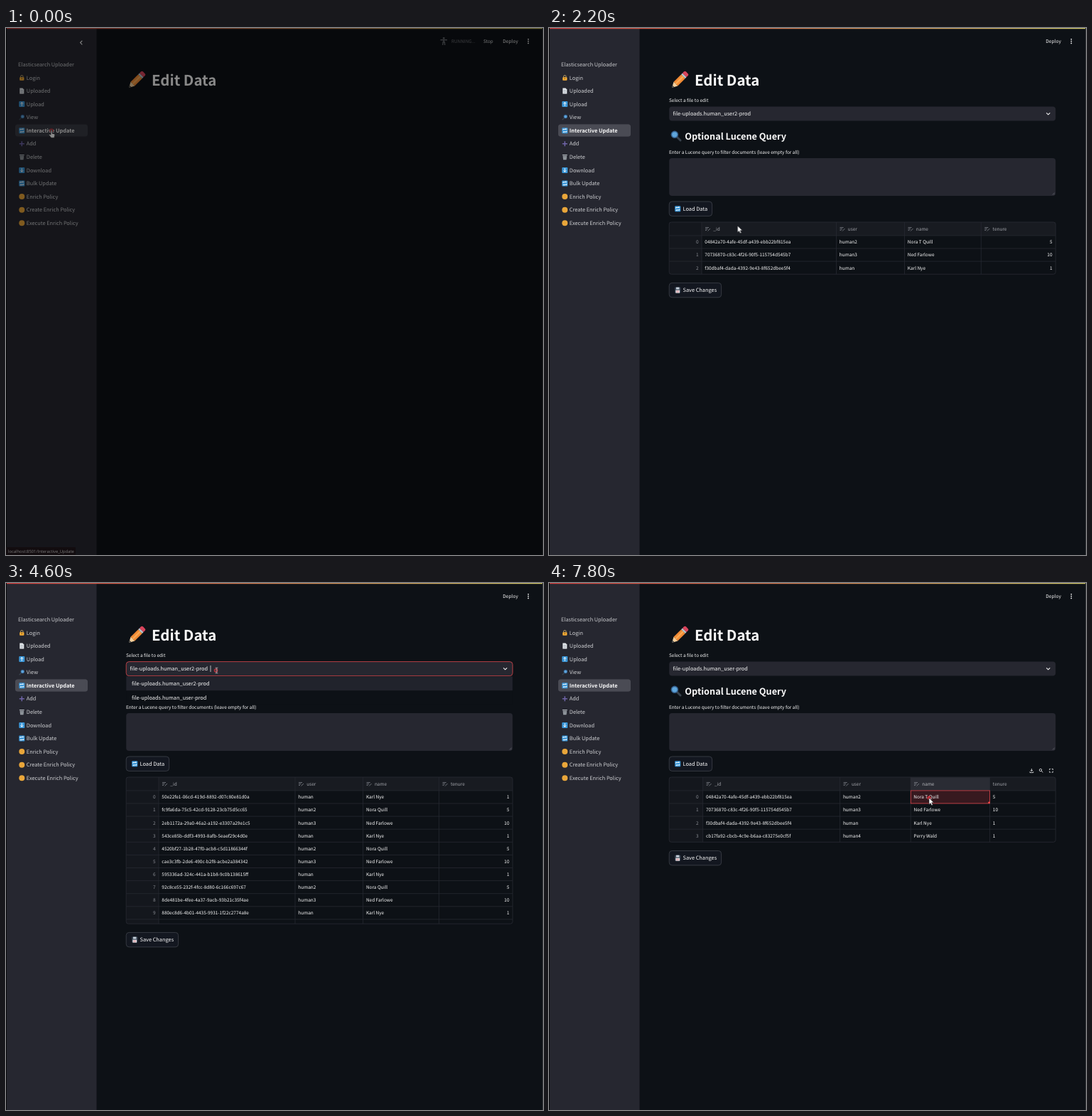
An HTML page that plays this animation: 756x741 px, repeating every 8 s.

```html
<!DOCTYPE html>
<html lang="en">
<head>
<meta charset="utf-8">
<title>Edit Data</title>
<style>
  html, body { margin: 0; width: 100%; height: 100%; overflow: hidden; background: #0d1116; }
  svg { display: block; width: 100vw; height: 100vh; text-rendering: geometricPrecision;
    font-family: "Noto Sans CJK JP", "Noto Sans CJK SC", "Noto Sans CJK", "Noto Sans", sans-serif; }
  .ripple { fill: none; stroke: #c4313c; stroke-width: 1.6px; animation: ripple 8s step-end infinite; }
  @keyframes ripple {
    0% { r: 2px; opacity: .9; }
    2.5% { r: 4px; opacity: .8; }
    5% { r: 9px; opacity: .65; }
    7.5%, 100% { r: 9px; opacity: 0; }
  }
  #cursor { animation: travel 8s infinite; }
</style>
</head>
<body>
<svg id="stage" viewBox="0 0 756 741"></svg>
<script>
const LOOP = 8000, STEP = 200;
const WHITE = '#fafafa', RED = '#ff4b4b', PANEL = '#262730', LINE = '#262932', BG = '#0d1116';
const BODY = 7.4, SMALL = 6.47;
let css = '';
let count = 0;

const pct = ms => `${ms / LOOP * 100}%`;

// Shows the markup only inside the given [from, to] spans.
function during(spans, markup) {
  const name = `show${count++}`;
  const frames = spans.map(([from, to]) =>
    `${pct(from)}{opacity:1}` + (to < LOOP ? `${pct(to)}{opacity:0}` : '')).join('');
  css += `@keyframes ${name}{0%{opacity:0}${frames}}`;
  return `<g style="opacity:0;animation:${name} 8s step-end infinite">${markup}</g>`;
}

// y is the middle of the capitals.
const text = (x, y, str, size = BODY, fill = WHITE, attrs = '') =>
  `<text x="${x}" y="${y + size * .367}" font-size="${size}" fill="${fill}" ${attrs}>${str}</text>`;
const rect = (x, y, w, h, fill, attrs = '') =>
  `<rect x="${x}" y="${y}" width="${w}" height="${h}" fill="${fill}" ${attrs}/>`;
const stroke = (d, color, width = 1, attrs = '') =>
  `<path d="${d}" fill="none" stroke="${color}" stroke-width="${width}" ${attrs}/>`;
const fill = (d, color) => `<path d="${d}" fill="${color}"/>`;
const dot = (x, y, r, color) => `<circle cx="${x}" cy="${y}" r="${r}" fill="${color}"/>`;
const at = (x, y, markup, more = '') => `<g transform="translate(${x} ${y}) ${more}">${markup}</g>`;

// Icons fill an 8 by 8 box.
const tile = glyph => rect(0, 0, 8, 8, '#3b97d8', 'rx="1"') + stroke(glyph, '#fff', 1);
const lens = stroke('M4.6 4.6L7.2 7.2', '#39424d', 1.5, 'stroke-linecap="round"') +
  dot(3, 3, 2.7, '#36618f') + dot(3, 3, 1.9, '#5fa6dc');
const icons = {
  lock: stroke('M2.3 4V2.4a1.7 1.7 0 0 1 3.4 0V4', '#b9a06a', 1) +
    rect(.9, 3.4, 6.2, 4.5, '#f5ad35', 'rx=".8"') + dot(4, 5.5, .7, '#5c3b12'),
  page: fill('M1 0h4l2 2v6H1z', '#e4e8ec') + stroke('M2.2 3h3.4M2.2 4.6h3.6M2.2 6.2h3.6', '#929ba5', .6),
  up: tile('M4 6.7V1.7M2.2 3.5L4 1.6l1.8 1.9'),
  down: tile('M4 1.3v5M2.2 4.5L4 6.4l1.8-1.9'),
  cycle: tile('M1.5 3.4V2.2h4.8M5.2 1l1.2 1.2M6.5 4.6v1.2H1.7M2.8 7L1.6 5.8'),
  view: at(8, 0, lens, 'scale(-1 1)'),
  plus: stroke('M4 .5v7M.5 4h7', '#6f64a8', 1.5),
  bin: stroke('M.6 1.2h6.8', '#b7bdc3', 1.1) + fill('M1.2 2.3h5.6L6.2 8H1.8z', '#a1a7ad') +
    stroke('M3 3v4M5 3v4', '#555b62', .6),
  disc: dot(4, 4, 4, '#e9a63a'),
  floppy: rect(0, 0, 8, 8, '#3c4856', 'rx=".8"') + rect(1.8, 0, 4.4, 2.8, '#c8d2dc') +
    rect(1.2, 4, 5.6, 4, '#e9edf0') + stroke('M2 5.3h4M2 6.7h4', '#d5606a', .6),
};

const pencil = at(184, 73, rect(-8, -4, 15, 8, '#f08a35') + rect(-8, -1.3, 15, 2.6, '#f9a852') +
  rect(7, -4, 2.5, 8, '#b9c6cd') + fill('M9.5-4h3q2 0 2 2v4q0 2-2 2h-3z', '#d9445c') +
  fill('M-8-4v8l-7.5-4z', '#f3cf9c') + fill('M-12.5-1.6v3.2l-3-1.6z', '#343a40'), 'rotate(-45)');

function sidebar() {
  const items = [['lock', 'Login'], ['page', 'Uploaded'], ['up', 'Upload'], ['view', 'View'],
    ['cycle', 'Interactive Update'], ['plus', 'Add'], ['bin', 'Delete'], ['down', 'Download'],
    ['cycle', 'Bulk Update'], ['disc', 'Enrich Policy'], ['disc', 'Create Enrich Policy'],
    ['disc', 'Execute Enrich Policy']];
  return rect(1, 1, 126.5, 740, PANEL) +
    rect(13, 135.5, 102, 17, '#3a3b44', 'rx="3.5"') +
    during([[800, LOOP]], rect(13, 135.5, 102, 17, '#4a4b54', 'rx="3.5"')) +
    text(17, 51, 'Elasticsearch Uploader', BODY, '#c9cacd') +
    items.map(([icon, label], i) => {
      const y = 69.8 + i * 18.59;
      const active = i === 4;
      return at(18.3, y - 4, icons[icon]) +
        text(28.8, y, label, BODY, active ? WHITE : '#cfd0d3', active ? 'font-weight="700"' : '');
    }).join('') +
    during([[0, 800]], stroke('M107.3 17.8l-2.7 2.8 2.7 2.8', WHITE, 1.1));
}

function header() {
  const running = dot(616.3, 14.3, 1.4, '#62656b') +
    stroke('M611.5 16.8h9.6M616.3 16.5v4M615.4 19l-.6 5M617.2 19l.6 5', '#62656b', 1.5) +
    text(627, 18.7, 'RUNNING...', 6.35, '#6d7076') + text(672, 18.7, 'Stop', 6.4, '#dcdddf');
  return during([[0, 800], [2600, 3600], [6400, 7000]], running) +
    text(699.3, 18.7, 'Deploy', 6.6) +
    [15.8, 18.6, 21.4].map(y => dot(735.3, y, .9, WHITE)).join('');
}

function button(y, w, icon, label, color = WHITE, edge = '#41444c') {
  return rect(169.2, y, w, 20.4, '#131720', `rx="4" stroke="${edge}" stroke-width=".8"`) +
    at(177.2, y + 6.2, icons[icon]) + text(188.5, y + 10.2, label, BODY, color);
}

function table({ cols, rows, bottom, plainTenure }) {
  const top = 273, rowH = 18.1, head = 18.9;
  const heads = ['_id', 'user', 'name', 'tenure'];
  let out = rect(169.2, top, 544, bottom - top, BG) +
    rect(169.2, top, 544, head, '#181b21') + rect(169.2, top, cols[0] - 169.2, bottom - top, '#14171d');
  let lines = cols.map(x => `M${x} ${top}V${bottom}`).join('');
  for (let y = top + head; y < bottom - 1; y += rowH) lines += `M169.2 ${y}H713`;
  out += stroke(lines, LINE, .8);
  heads.forEach((label, i) => {
    const bare = plainTenure && i === 3;
    if (!bare) out += stroke(`M${cols[i] + 5} 280.5h5m-5 2h3.5m-3.5 2h2m1.5 1l3.5-3.5`, '#858890', .8);
    out += text(cols[i] + (bare ? 4.2 : 16.3), 282.8, label, SMALL, '#a3a5ab');
  });
  rows.forEach(([id, user, name, tenure], i) => {
    const y = 301 + i * rowH;
    out += text(210.5, y, i, SMALL, '#8b8e95', 'text-anchor="end"');
    [id, user, name].forEach((value, c) => out += text(cols[c] + 4.3, y, value, SMALL));
    out += plainTenure ? text(cols[3] + 4.2, y, tenure, SMALL)
      : text(708.5, y, tenure, SMALL, WHITE, 'text-anchor="end"');
  });
  return out + rect(169.2, top, 544, bottom - top, 'none', `rx="3" stroke="${LINE}" stroke-width=".9"`) +
    button(bottom + 12.2, 73.4, 'floppy', 'Save Changes');
}

const karl = ['human', 'Karl Nye', 1];
const nora = ['human2', 'Nora Quill', 5];
const noraT = ['human2', 'Nora T Quill', 5];
const ned = ['human3', 'Ned Farlowe', 10];
const perry = ['human4', 'Perry Wald', 1];

const shortRows = [
  ['04842a70-4afe-45df-a439-ebb22bf815ea', ...noraT],
  ['70736870-c83c-4f26-90f5-115754d545b7', ...ned],
  ['f30dbaf4-dada-4392-9e43-8f652dbee5f4', ...karl],
];
const longRows = [
  '50e22fe1-06cd-419d-8892-d07c80e81d0a', 'fc9fa6da-75c5-42cd-9128-23cb75d5cc65',
  '2eb1172a-29a0-46a2-a192-e3307a29e1c5', '543ce85b-ddf3-4993-8afb-5eaef29c4d0e',
  '4520bf27-1b28-47f0-acb8-c5d11866344f', 'cae3c3fb-2de6-490c-b2f8-acbe2a384342',
  '595336ad-324c-441a-b1b8-9c0b138615ff', '92c8ce55-232f-4fcc-8d80-6c166c697c67',
  '8de481be-4fee-4a37-9acb-93b21c35f4ae', '880ec8d6-4b01-4435-9931-1f22c2774a8e',
].map((id, i) => [id, ...[karl, nora, ned][i % 3]]);

function tables() {
  const toolbar = stroke('M679.4 261v3.6m-1.6-1.6l1.6 1.7 1.6-1.7m-4 2.2v1.4h4.8v-1.4', '#d5d6d9', .9) +
    `<circle cx="692" cy="263" r="1.7" fill="none" stroke="#d5d6d9" stroke-width=".9"/>` +
    stroke('M693.3 264.3l2 2', '#d5d6d9', 1) +
    stroke('M704.6 263v-1.6h1.6m1.6 0h1.6v1.6m0 1.6v1.6h-1.6m-1.6 0h-1.6v-1.6', '#d5d6d9', .9);
  const selected = rect(509, 273.4, 111.5, 18.3, '#2a2c34') +
    stroke('M514 280.5h5m-5 2h3.5m-3.5 2h2m1.5 1l3.5-3.5', '#858890', .8) +
    text(525.3, 282.8, 'name', SMALL, '#b5b7bc') +
    rect(509.3, 291.9, 111.2, 18, '#37191f', 'stroke="#c83f46" stroke-width=".9"') +
    dot(619.5, 308.8, 1.3, RED) + text(513.3, 301, noraT[1], SMALL) + dot(535, 302, 2.6, '#c4313c');
  return during([[800, 3400]], table({ cols: [215, 404.5, 500.5, 608.3], rows: shortRows, bottom: 346.2 })) +
    during([[3400, 6800]], table({ cols: [215, 407, 502.6, 609.6], rows: longRows, bottom: 479.2 })) +
    during([[6800, LOOP]], table({ cols: [216.6, 409.6, 509.2, 620.6], bottom: 364.3, plainTenure: true,
      rows: [...shortRows, ['cb17fa92-cbcb-4c9e-b6aa-c83275e0cf5f', ...perry]] })) +
    during([[1400, 2200], [3800, 4400], [7000, LOOP]], toolbar) +
    during([[7800, LOOP]], selected);
}

function form() {
  const second = 'file-uploads.human_user2-prod', first = 'file-uploads.human_user-prod';
  const box = rect(169.2, 110.6, 544, 20, PANEL, 'rx="4"');
  const option = (y, label) => text(177, y, label);
  const menu = rect(169.2, 131.2, 544, 39.5, BG) +
    during([[4600, 4800]], rect(169.2, 131.2, 544, 20, '#21232c')) +
    during([[4800, 5400]], rect(169.2, 151.2, 544, 19.5, '#21232c')) +
    option(141, second) + option(161.4, first) + stroke('M288 116v9', WHITE, .7);
  return text(169, 102, 'Select a file to edit', SMALL) + box +
    during([[0, 5400]], text(174.5, 120.6, second)) +
    during([[5400, LOOP]], text(174.5, 120.6, first)) +
    stroke('M700.3 119.3l2.5 2.5 2.5-2.5', WHITE, 1.1) +
    during([[4600, 6200]], rect(169.2, 110.6, 544, 20, 'none', `rx="4" stroke="#c9444a" stroke-width=".9"`)) +
    at(171, 144, lens, 'scale(1.95)') +
    text(191.3, 152, 'Optional Lucene Query', 12.7, WHITE, 'font-weight="600"') +
    text(169, 174.8, 'Enter a Lucene query to filter documents (leave empty for all)', SMALL) +
    rect(169.2, 183, 544, 53, PANEL, 'rx="4"') + stroke('M708.8 234.5l3-3m-1.2 3l1.2-1.2', '#777a82', .6) +
    button(244, 60.4, 'cycle', 'Load Data') +
    during([[2400, 4600], [5800, 7800]], button(244, 60.4, 'cycle', 'Load Data', RED, '#d3484d')) +
    during([[4600, 5400]], menu);
}

function statusBar() {
  const bar = rect(0, 730, 98, 11, '#21161c', 'rx="1"') +
    `<text x="3" y="737.5" font-size="5.85" fill="#e3e1e2" font-family="Open Sans, Noto Sans, sans-serif">localhost:8501/Interactive_Update</text>`;
  return during([[0, 1200]], bar) + during([[1200, 1400]], `<g opacity=".55">${bar}</g>`);
}

function cursor() {
  const path = [[0, 64, 144], [400, 64, 144], [1200, 502, 271], [1600, 465, 305], [2000, 320, 300],
    [2400, 211, 256], [3400, 211, 256], [4000, 330, 400], [4200, 335, 330], [4600, 296.5, 123],
    [4800, 280, 158], [5400, 280, 158], [5800, 202.5, 260], [6600, 202.5, 260], [7200, 560, 300],
    [7400, 560, 300], [7800, 535, 302], [LOOP, 535, 302]];
  css += '@keyframes travel{' + path.map(([t, x, y], i) => {
    const next = path[i + 1];
    const steps = next ? (next[0] - t) / STEP : 1;
    return `${pct(t)}{transform:translate(${x}px,${y}px);animation-timing-function:steps(${steps},end)}`;
  }).join('') + '}';
  const shape = d => `<path d="${d}" fill="#fff" stroke="#15171c" stroke-width=".6" stroke-linejoin="round"/>`;
  const hand = shape('M-1 1a1 1 0 0 1 2 0v3.2l3 .7q1 .3.8 1.6l-.6 3q-.2.9-1 .9h-3q-.7 0-1.1-.6l-2.6-3.4q-.4-1.1.6-1.2l1.9 1z');
  const arrow = shape('M0 0v9.4l2.1-1.9 1.6 3.3 1.6-.8-1.5-3.2h2.9z');
  const beam = stroke('M-1.6-4q1.6 0 1.6 1v6q0 1-1.6 1M1.6-4q-1.6 0-1.6 1M1.6 4q-1.6 0-1.6-1', '#d2d2d4', .8);
  return [[0, 64, 144], [2400, 211, 256], [4600, 295.5, 123], [5400, 280, 158], [6200, 202.5, 260]]
    .map(([t, x, y]) =>
      `<circle class="ripple" cx="${x}" cy="${y}" r="2" style="animation-delay:${t - LOOP}ms"/>`).join('') +
    `<g id="cursor">${
      during([[0, 600], [2400, 3600], [4800, 6800]], hand) +
      during([[600, 2400], [3600, 4400], [6800, LOOP]], arrow) +
      during([[4400, 4800]], beam)}</g>`;
}

const scene = `<defs><linearGradient id="strip"><stop stop-color="#d8413f"/>
    <stop offset="1" stop-color="#d8cf70"/></linearGradient></defs>` +
  rect(0, 0, 756, 741, BG) + sidebar() + header() + pencil +
  text(205, 73.6, 'Edit Data', 20.4, WHITE, 'font-weight="700"') +
  during([[800, LOOP]], tables() + form()) +
  rect(0, 0, 1, 741, '#08090c') + rect(755, 0, 1, 741, '#2a2d30') +
  rect(1, 0, 754, 1.2, 'url(#strip)') +
  statusBar() + cursor() +
  during([[0, STEP]], rect(0, 0, 756, 741, '#000', 'fill-opacity=".46"'));

document.getElementById('stage').innerHTML = `<style>${css}</style>${scene}`;
</script>
</body>
</html>
```
